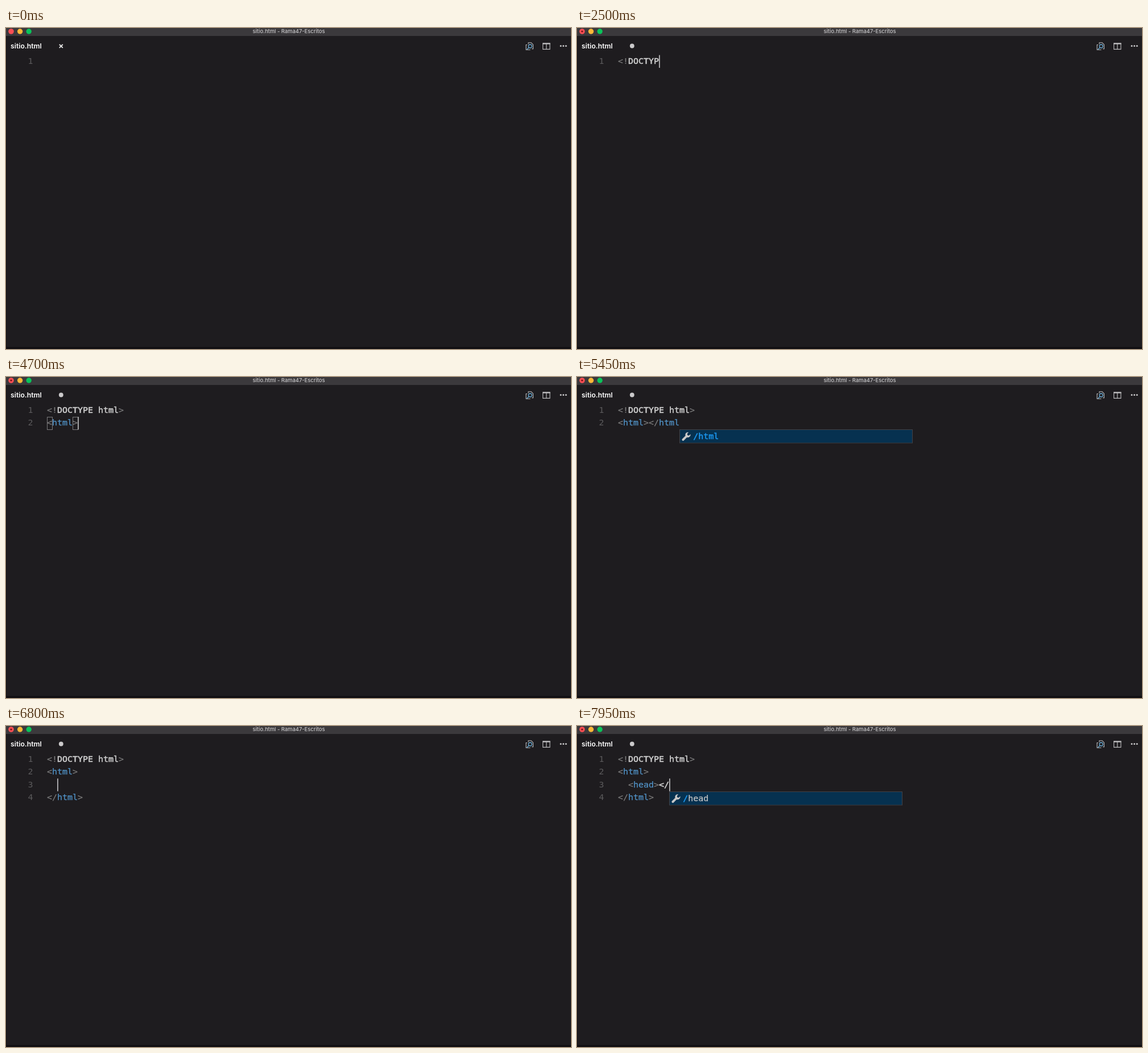
Recreate the animation shown at these times as an HTML page. Size 993 px wide and 564 px high, loop 8000 ms.

```html
<!DOCTYPE html>
<html lang="es">
<head>
<meta charset="utf-8">
<title>Editor</title>
<style>
  html, body { margin: 0; width: 100%; height: 100%; overflow: hidden; background: #1e1c1f; }
  svg { display: block; width: 993px; height: 564px; }
  text { white-space: pre; }
  .ui { font-family: Inter, "Liberation Sans", sans-serif; }
  .mono { font: 14.95px "DejaVu Sans Mono", monospace; }
  .plain { fill: #d0d0d0; stroke: #d0d0d0; stroke-width: .5px; }
  .mark { fill: #808080; stroke: #808080; stroke-width: .1px; }
  .tag { fill: #5295ca; stroke: #5295ca; stroke-width: .25px; }
  .num { fill: #5c5b5d; }
  .item { fill: #c6c6c6; stroke: #c6c6c6; stroke-width: .25px; }
  .hit { fill: #1b97f0; stroke: #1b97f0; stroke-width: .5px; }
</style>
</head>
<body>
<svg viewBox="0 0 993 564">
  <defs>
    <path id="wrench" fill="#c8c8c8" d="M15.5 4L12.6 6.4 10.2 5.8 9.6 3.4 12 .6C8.5 0 5.5 3 6.6 6.8L.8 12.4a2 2 0 0 0 2.8 2.8L9.2 9.6C13 10.6 16 7.5 15.5 4Z"/>
  </defs>
  <rect width="993" height="564" fill="#1e1c1f"/>
  <rect width="993" height="14" fill="#3b393c"/>
  <path d="M0 14h1v550H0zM0 560.5h993v3.5H0z" fill="#110f12"/>
  <circle cx="9" cy="6" r="4.8" fill="#fb4f54"/>
  <circle cx="24.6" cy="6" r="4.7" fill="#fdb838"/>
  <circle cx="40.2" cy="6" r="4.7" fill="#0ac45a"/>
  <text class="ui" x="497" y="9.2" font-size="9.4" font-weight="500" text-anchor="middle" fill="#c9c8ca">sitio.html - Rama47-Escritos</text>
  <text class="ui" x="8" y="36" font-size="12.2" font-weight="600" fill="#fff">sitio.html</text>
  <path id="close" d="M93.8 28.8l6 6m0-6l-6 6" stroke="#e8e8e8" stroke-width="1.9"/>
  <g id="unsaved">
    <circle cx="96.8" cy="31.5" r="3.9" fill="#cbcacb"/>
    <circle cx="9" cy="6" r="1.6" fill="#6a1014"/>
  </g>
  <g fill="none" stroke="#bdbcbe" stroke-width="1.1">
    <path d="M916 29.5h-2v8.8h7.5M918 28.5v-2.7h5l3.4 3.4v7.6h-2.2"/>
    <circle cx="921.2" cy="32" r="3" stroke="#6aa9d0" stroke-width="1.3"/>
    <path d="M919 34.3l-3.6 3.6" stroke="#6aa9d0" stroke-width="1.4"/>
    <path d="M943.6 27.2h12.3v10.2h-12.3zM949.7 27v10.4"/>
    <path d="M943 27.4h13.5" stroke-width="2.4"/>
  </g>
  <g fill="#c9c8ca">
    <circle cx="975" cy="31.6" r="1.5"/><circle cx="979.6" cy="31.6" r="1.5"/><circle cx="984.2" cy="31.6" r="1.5"/>
  </g>
  <g id="editor"></g>
</svg>
<script>
const LOOP = 8000, CHAR = 9, ROW = 22.35, LEFT = 72, TOP = 47.6;
const editor = document.getElementById('editor');
const closeIcon = document.getElementById('close');
const unsaved = document.getElementById('unsaved');

// start, gap between keys, keys (← moves the caret)
const typing = [
  [900, 0, '<'], [1600, 0, '!'], [1800, 100, 'DO'], [2100, 100, 'CTY'],
  [2450, 100, 'PE'], [2750, 100, ' htm'], [3200, 200, 'l>'], [3900, 0, '\n'],
  [4150, 80, '<html>'], [4900, 0, '<'], [5050, 0, '/'], [5150, 100, 'html'],
  [5600, 0, '>'], [5950, 50, '←'.repeat(7)], [6400, 0, '\n'],
  [6900, 90, '<head>'], [7550, 0, '<'], [7800, 0, '/']
];
const caretGaps = [[0, 50], [3900, 4000], [5450, 5600]];

const tags = ('a abbr address area article aside audio b base bdi bdo blockquote ' +
  'h1 h2 h3 h4 h5 h6 head header hr html').split(' ');
const docs = {
  a: 'If the a element has an href attribute, then it rep...',
  h1: 'The h1 element represents a section heading.',
  head: 'The head element represents a collection of met...',
  html: 'The html element represents the root of an HTM...'
};

function press(state, key, at) {
  const lines = [...state.lines];
  let { row, col, entered } = state;
  const before = lines[row].slice(0, col), after = lines[row].slice(col);
  if (key === '←') col--;
  else if (key === '\n') {
    const split = before.endsWith('>') && after.startsWith('</');
    lines.splice(row, 1, before, ...(split ? ['  ', after] : [after]));
    row++;
    col = split ? 2 : 0;
    entered = at;
  } else {
    lines[row] = before + key + after;
    col++;
  }
  return { at, lines, row, col, entered };
}

const states = [{ at: 50, lines: [''], row: 0, col: 0, entered: -LOOP }];
for (const [start, gap, keys] of typing)
  [...keys].forEach((key, i) => states.push(press(states[states.length - 1], key, start + i * gap)));

const escape = s => s.replace(/&/g, '&amp;').replace(/</g, '&lt;');
const span = (cls, s) => s ? `<tspan class="${cls}">${escape(s)}</tspan>` : '';
const rect = (x, y, w, h, paint) => `<rect x="${x}" y="${y}" width="${w}" height="${h}" ${paint}/>`;

function colour(line) {
  return line.replace(/(<!)|(<\/?)(\w+)|(>)|([^<>]+|<\/?)/g, (all, bang, open, name, end) =>
    bang || end ? span('mark', all) : open ? span('mark', open) + span('tag', name) : span('plain', all));
}

function popup(before, x, y) {
  const match = /<(\/?\w*)$/.exec(before);
  if (!match) return '';
  const typed = match[1], opened = /<(\w+)>/.exec(before);
  const items = [...(opened ? ['/' + opened[1]] : []), ...tags]
    .filter(item => item.startsWith(typed)).slice(0, 12);
  const doc = docs[items[0]], step = 22.45;
  const rowTop = i => y + 1 + step * (i + (doc && i ? 1 : 0));
  const height = step * (items.length + (doc ? 1 : 0)) + 1;
  let out = rect(x + .5, y + .5, 409, height, 'fill="#2d2c2f" stroke="#434246"') +
    rect(x + 1, y + 1, 408, step * (doc ? 2 : 1), 'fill="#063150"');
  if (items.length === 12) out += rect(x + 400, y + 1, 9, 26, 'fill="#123b58"');
  items.forEach((item, i) => {
    const top = rowTop(i);
    out += `<use href="#wrench" x="${x + 4}" y="${top + 3.5}"/>` +
      `<text class="mono" x="${x + 24.3}" y="${top + 15.8}">` +
      span('hit', item.slice(0, typed.length)) + span('item', item.slice(typed.length)) + '</text>';
  });
  if (doc) out += `<text class="ui" x="${x + 24}" y="${y + 39}" font-size="15" fill="#a5b5c1">${doc}</text>` +
    `<circle cx="${x + 389}" cy="${y + 34}" r="6.6" fill="#2b87cb"/>` +
    `<path d="M${x + 389} ${y + 30}v1.8m0 1.2v4.8" stroke="#e4f1fa" stroke-width="1.7"/>`;
  return out;
}

function scene(t) {
  const s = states.filter(k => k.at <= t).pop() || states[0];
  const rowY = TOP + ROW * s.row;
  const indent = LEFT + CHAR * s.col;
  const before = s.lines[s.row].slice(0, s.col);
  let out = '';

  const bracket = /<[^<>]*>$/.exec(before);
  if (bracket) for (const col of [bracket.index, s.col - 1])
    out += rect(LEFT + CHAR * col + .5, Math.round(rowY) + .5, CHAR, 22, 'fill="none" stroke="#7c7b7d"');

  s.lines.forEach((line, i) => {
    const y = 63 + ROW * i;
    out += `<text class="mono num" x="47.6" y="${y}" text-anchor="end">${i + 1}</text>` +
      `<text class="mono" x="${LEFT}" y="${y}">${colour(line)}</text>`;
  });

  const hidden = caretGaps.some(([from, to]) => t >= from && t < to);
  if (!hidden && (t - s.at) % 1000 < 500)
    out += rect(indent, rowY, 1.8, ROW, 'fill="#b4b3b5"');

  const sinceEnter = t - s.entered;
  if (sinceEnter >= 50 && sinceEnter < 200)
    out += rect(983, 47, 10, 544 - 19 * s.lines.length, 'fill="#414042"');

  return out + popup(before, indent, Math.round(rowY + ROW));
}

let shown = null;
function draw(t) {
  const dirty = t >= 900;
  closeIcon.style.display = dirty ? 'none' : '';
  unsaved.style.display = dirty ? '' : 'none';
  const next = scene(t);
  if (next !== shown) editor.innerHTML = shown = next;
}

const begin = performance.now();
function tick() {
  draw((performance.now() - begin) % LOOP);
  requestAnimationFrame(tick);
}
tick();
</script>
</body>
</html>
```
